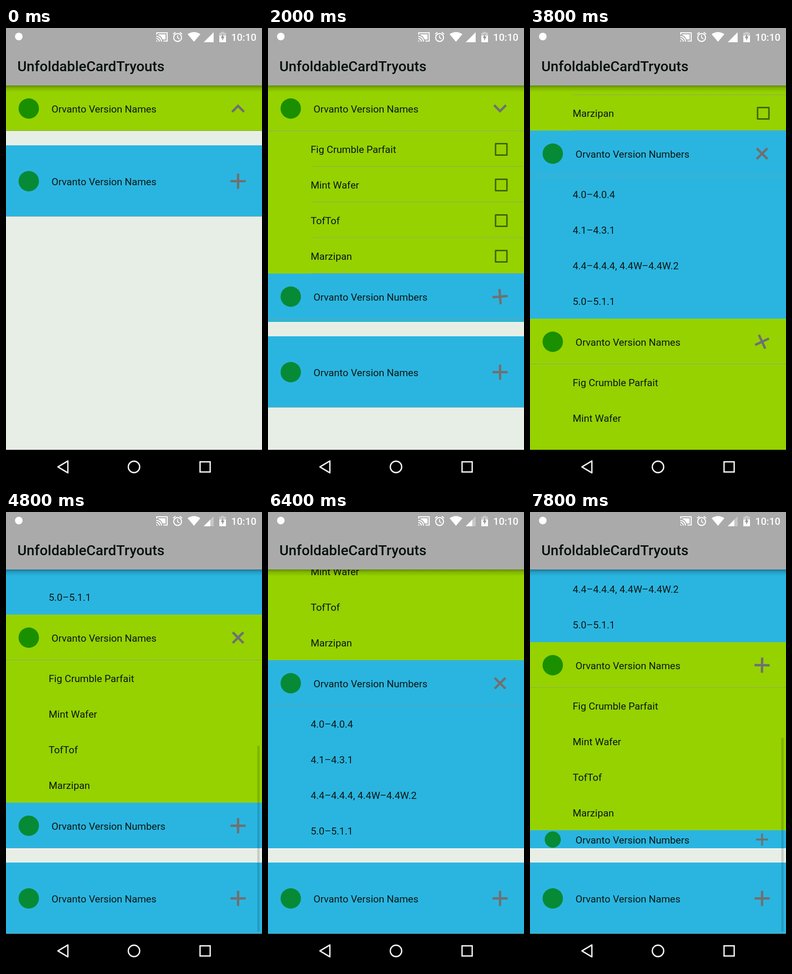
Write an HTML page with a canvas that moves like this. It is 540x960 px and loops after 8 s.

```html
<!DOCTYPE html>
<html>
<head>
<meta charset="utf-8">
<style>
  html, body { margin: 0; width: 100%; height: 100%; overflow: hidden; background: #000; }
  canvas { display: block; width: 540px; height: 960px; }
</style>
</head>
<body>
<canvas id="stage" width="540" height="960"></canvas>
<script>
const g = document.getElementById('stage').getContext('2d');
const LOOP = 8000, STEP = 200;
const TOP = 121, BOTTOM = 888, VIEW = BOTTOM - TOP;
const HEAD = 96, ROW = 75, GAP = 30, CARD = 150;
const GREEN = { bg: '#95d200', badge: '#1a8f00' };
const BLUE = { bg: '#2ab5e1', badge: '#078a36' };
const LINE = 'rgba(145,148,140,.65)';
const NAMES = 'Orvanto Version Names', NUMBERS = 'Orvanto Version Numbers';
const SWEETS = ['Fig Crumble Parfait', 'Mint Wafer', 'TofTof', 'Marzipan'];
const VERSIONS = ['4.0–4.0.4', '4.1–4.3.1', '4.4–4.4.4, 4.4W–4.4W.2', '5.0–5.1.1'];

// Each panel holds the next one below its four rows.
const panels = [
  { skin: GREEN, title: NAMES, rows: SWEETS, checks: true, opens: 190 },
  { skin: BLUE, title: NUMBERS, rows: VERSIONS, opens: 1977 },
  { skin: GREEN, title: NAMES, rows: SWEETS, opens: 3621, closes: 7725 },
  { skin: BLUE, title: NUMBERS, rows: VERSIONS, opens: 5150, closes: 6750 }
];
const swipes = [[2350, 2760, 303], [4380, 4780, 396], [5580, 5900, 300]];
const barTimes = [...swipes, [6750, 7050], [7725, 8025]];

const clamp = x => Math.max(0, Math.min(1, x));
const ramp = (t, a, b) => clamp((t - a) / (b - a));
const ease = (t, a, b) => (1 - Math.cos(Math.PI * ramp(t, a, b))) / 2;
const openness = (p, t) =>
  ease(t, p.opens, p.opens + 300) - (p.closes ? ease(t, p.closes, p.closes + 300) : 0);
const inner = i => panels[i].open * (4 * ROW + height(i + 1));
const height = i => i < panels.length ? HEAD + inner(i) : 0;

function rect(x, y, w, h, color) {
  g.fillStyle = color;
  g.fillRect(x, y, w, h);
}

function text(str, x, y, color = '#0b1710', font = '21px') {
  g.font = font + ' Roboto, sans-serif';
  g.fillStyle = color;
  g.fillText(str, x, y);
}

// Strokes the current path when a width is given, else fills it.
function paint(color, width) {
  if (width) {
    g.strokeStyle = color;
    g.lineWidth = width;
    g.stroke();
  } else {
    g.fillStyle = color;
    g.fill();
  }
}

function shape(points, color, width) {
  g.beginPath();
  points.forEach(([x, y]) => g.lineTo(x, y));
  paint(color, width);
}

function arc(x, y, r, color, width, a = 0, b = 2 * Math.PI) {
  g.beginPath();
  g.arc(x, y, r, a, b);
  paint(color, width);
}

function clipped(y, h, draw) {
  g.save();
  g.beginPath();
  g.rect(0, y, 540, h);
  g.clip();
  draw();
  g.restore();
}

function header(y, h, skin, title, open, chevron) {
  const mid = y + h / 2, scale = Math.min(1, h / 48);
  rect(0, y, 540, h, skin.bg);
  if (h >= HEAD) rect(0, y + h - 1, 540, 1, LINE);
  arc(48, mid + 0.5, 21.5 * scale, skin.badge);
  text(title, 96, Math.round(mid + 8.5));
  g.save();
  g.translate(489.5, mid + 0.5);
  g.scale(scale, scale);
  g.rotate(-open * (chevron ? 180 : 315) * Math.PI / 180);
  if (chevron) {
    shape([[-12.5, 7], [0, -5.5], [12.5, 7]], '#6f7170', 5);
  } else {
    rect(-16, -2.5, 32, 5, '#6f7170');
    rect(-2.5, -16, 5, 32, '#6f7170');
  }
  g.restore();
}

function panel(i, y, room) {
  const p = panels[i];
  if (room < 1) return;
  clipped(y, room, () => {
    rect(0, y, 540, room, p.skin.bg);
    header(y, Math.min(HEAD, room), p.skin, p.title, p.open, i === 0);
    let rowY = y + HEAD, left = Math.min(inner(i), room - HEAD);
    for (const name of p.rows) {
      const rowH = Math.min(ROW, left);
      if (rowH < 1) return;
      row(name, rowY, rowH, p.checks);
      rowY += rowH;
      left -= rowH;
    }
    if (i + 1 < panels.length) panel(i + 1, rowY, left);
  });
}

function row(name, y, h, check) {
  const mid = y + h / 2;
  // Padding leaves no room for text in a very flat row.
  if (h > ROW / 3) clipped(y, h, () => text(name, 90, Math.round(mid + 8.5)));
  if (!check) return;
  clipped(y, h, () => {
    g.strokeStyle = '#426005';
    g.lineWidth = 3;
    g.lineJoin = 'round';
    g.strokeRect(480, mid - 11, 24, 24);
    g.lineJoin = 'miter';
    rect(91, y + h - 1, 449, 1, LINE);
  });
}

function content(t) {
  panels.forEach(p => p.open = openness(p, t));
  const total = height(0) + GAP + CARD;
  const slack = t < 3300 ? 2 : 0;
  const swiped = swipes.reduce((sum, [a, b, d]) => sum + d * ease(t, a, b), 0);
  const scroll = Math.max(0, Math.min(swiped + slack - 2, total - VIEW + slack));

  rect(0, TOP, 540, VIEW, '#e7eee6');
  const y = Math.round(TOP - scroll), h = Math.round(height(0));
  panel(0, y, h);
  rect(0, y + h, 540, 2, '#f3f6f2');
  header(y + h + GAP, CARD, BLUE, NAMES, 0);

  const glow = ramp(t, 2650, 2760) * (1 - ramp(t, 2800, 3100));
  if (glow) {
    const rise = 0.4 + 0.6 * glow;
    g.beginPath();
    g.moveTo(0, BOTTOM);
    g.lineTo(0, BOTTOM - 53 * rise);
    g.quadraticCurveTo(270, BOTTOM - 127 * rise, 540, BOTTOM - 53 * rise);
    g.lineTo(540, BOTTOM);
    paint(`rgba(150,150,150,${0.3 * glow})`);
  }

  const bar = Math.max(...barTimes.map(([a, b]) => t < a ? 0 : 1 - ramp(t, b + 400, b + 480)));
  if (bar && total > VIEW) {
    const barY = TOP + 6 + scroll / total * VIEW;
    const barH = VIEW * VIEW / total - 9;
    rect(530, barY, 5, Math.min(barH, BOTTOM - 5 - barY), `rgba(0,0,0,${0.14 * bar})`);
  }

  const shade = g.createLinearGradient(0, TOP, 0, TOP + 14);
  shade.addColorStop(0, 'rgba(0,0,0,.34)');
  shade.addColorStop(0.4, 'rgba(0,0,0,.13)');
  shade.addColorStop(1, 'rgba(0,0,0,0)');
  rect(0, TOP, 540, 14, shade);
}

function statusBar(t) {
  const white = '#fff', faint = 'rgba(255,255,255,.35)';
  rect(0, 0, 540, TOP, '#abaaab');
  text('UnfoldableCardTryouts', 24, 91, '#06120c', '500 30px');
  arc(27, 18, 8, white);

  // cast
  shape([[318, 14], [318, 10], [340, 10], [340, 27.5], [332, 27.5]], white, 2.2);
  g.beginPath();
  g.moveTo(321.5, 13.3);
  g.lineTo(336.6, 13.3);
  g.lineTo(336.6, 24.2);
  g.lineTo(330.5, 24.2);
  g.quadraticCurveTo(328, 17.5, 321.5, 15.1);
  paint(white);
  shape([[317, 25.3], [317, 28.6], [320.3, 28.6]], white);
  [6.6, 11].forEach(r => arc(317, 28.6, r, white, 2.2, -Math.PI / 2, 0));
  // alarm
  arc(362, 20, 8.3, white, 2.2);
  shape([[362, 15], [362, 20.5], [366, 23]], white, 1.8);
  shape([[352.5, 13], [357.5, 9]], white, 2.2);
  shape([[366.5, 9], [371.5, 13]], white, 2.2);
  // wireless
  g.beginPath();
  g.moveTo(396.5, 29);
  g.lineTo(383, 13);
  g.quadraticCurveTo(396.5, 4, 410, 13);
  paint(white);
  // signal
  const weak = t >= 4400;
  shape([[417, 30], [438, 9], [438, 30]], weak ? faint : white);
  if (weak) shape([[417, 30], [431, 16], [431, 30]], white);
  // battery
  rect(454, 8, 6, 2, faint);
  rect(450, 10, 14, 6, faint);
  rect(450, 16, 14, 14, white);
  shape([[458, 12], [453, 21], [456, 21], [456, 27], [461, 18], [458, 18]], '#9b9a9b');
  text('10:10', 475, 27, white, '500 21px');
}

function navBar() {
  const ink = '#f3f3f3';
  rect(0, BOTTOM, 540, 960 - BOTTOM, '#000');
  g.lineJoin = 'round';
  shape([[109.5, 924], [130.5, 911.5], [130.5, 936.5], [109.5, 924], [130.5, 911.5]], ink, 2.8);
  g.lineJoin = 'miter';
  arc(270, 924, 12, ink, 2.8);
  g.strokeRect(409.3, 913.3, 21.4, 21.4);
}

function frame() {
  // The screen refreshes five times a second.
  const t = Math.floor(performance.now() % LOOP / STEP) * STEP;
  clipped(TOP, VIEW, () => content(t));
  statusBar(t);
  navBar();
  requestAnimationFrame(frame);
}
frame();
</script>
</body>
</html>
```
